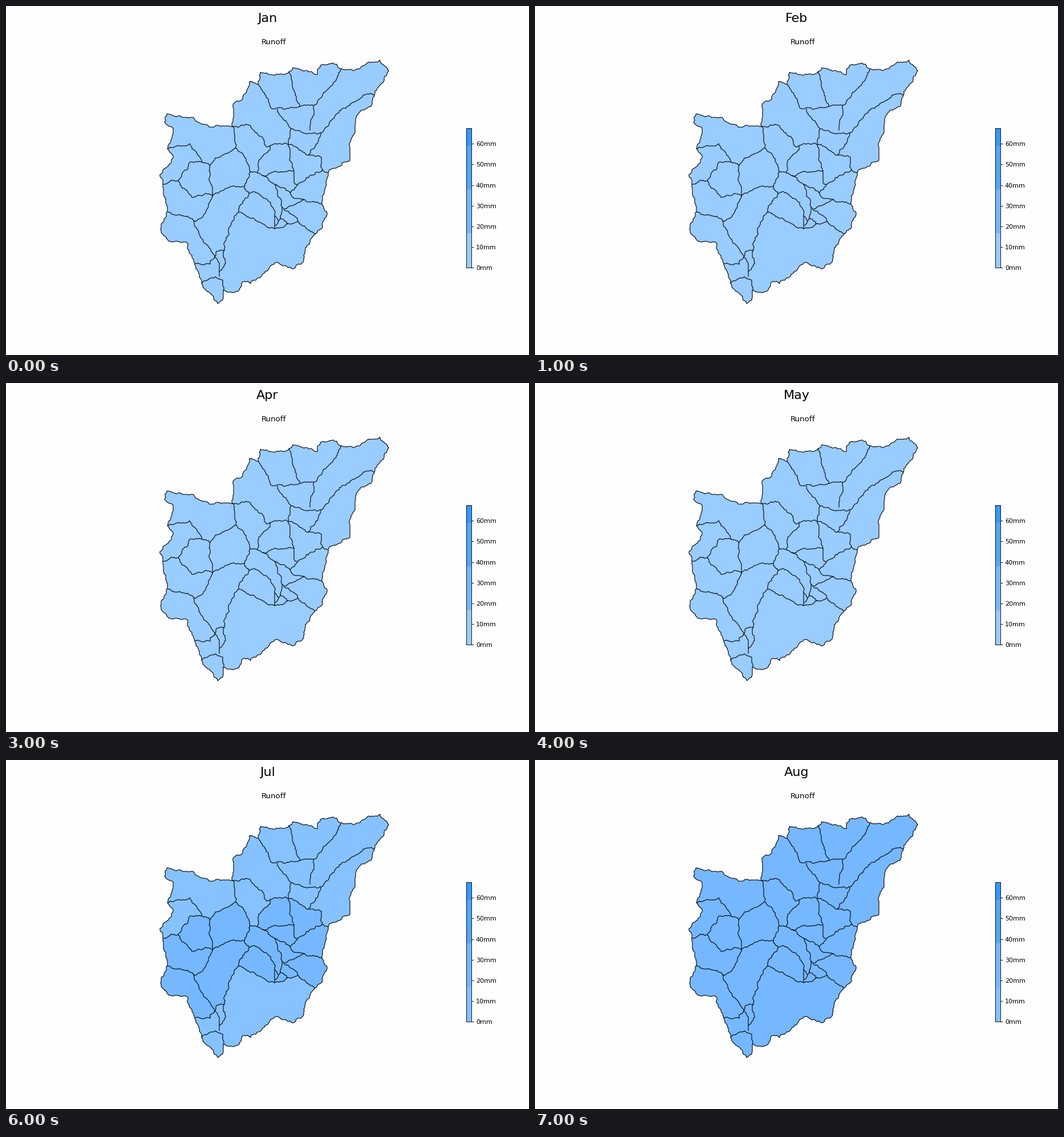
A matplotlib script for the animation above (8000 ms loop, 917 px wide and 611 px high).

```python
import numpy as np
import matplotlib.pyplot as plt
from matplotlib.animation import FuncAnimation
from matplotlib.collections import LineCollection
from matplotlib.patches import Polygon

W, H, DPI = 917, 611, 80
MONTHS = ["Jan", "Feb", "Mar", "Apr", "May", "Jun", "Jul", "Aug"]
PALE, SOFT, MILD = "#99ccff", "#94c8ff", "#85c2ff"
MID, DEEP, FULL = "#75b8ff", "#54a7ff", "#3399ff"

rng = np.random.default_rng(4)
borders = []


def roughen(a, b):
    """Split a-b by midpoint displacement; returns the points after a."""
    d = b - a
    length = np.hypot(*d)
    if length < 3.2 or d[0] == 0:  # upright borders stay straight
        return [b]
    side = np.array([-d[1], d[0]]) / length
    shift = rng.uniform(-1, 1) * min(0.19 * length, 2.2)
    m = np.round((a + b) / 2 + side * shift)
    if (m == a).all() or (m == b).all():
        return [b]
    return roughen(a, m) + roughen(m, b)


def line(*knots):
    """Store a ragged border through the key points."""
    pts = np.array(knots, float)
    out = [pts[0]]
    for a, b in zip(pts[:-1], pts[1:]):
        out += roughen(a, b)
    borders.append(np.array(out))
    return borders[-1]


# Outer edge, clockwise
northwest = line((275, 312), (270, 295), (293, 265), (283, 250), (293, 214),
                 (278, 203), (282, 189), (326, 195), (356, 212), (397, 211))
north = line((397, 211), (398, 172), (415, 163), (427, 132), (442, 137),
             (446, 116), (468, 121), (496, 115), (503, 108), (546, 120),
             (551, 104), (580, 102), (587, 110))
northeast = line((587, 110), (620, 110), (636, 98), (656, 95), (671, 113),
                 (646, 156), (640, 176), (617, 190), (605, 235), (603, 270),
                 (587, 280), (565, 292))
east = line((565, 292), (555, 332), (554, 347), (563, 365), (553, 390), (542, 399))
south = line((542, 399), (525, 427), (519, 450), (504, 460), (473, 449),
             (429, 486), (418, 482), (404, 500), (381, 498), (380, 515),
             (371, 521), (343, 486), (331, 451))
west = line((331, 451), (317, 414), (284, 410), (271, 390), (283, 360),
            (276, 330), (275, 312))

# Inner borders that rim the wetter basins
rim_west = line((275, 312), (302, 306), (323, 273), (344, 273), (358, 279),
                (372, 265), (403, 249), (416, 260), (428, 291), (441, 292))
rim_east = line((441, 292), (443, 270), (463, 252), (463, 244), (495, 242),
                (530, 261), (553, 265), (555, 287), (565, 292))
rim_south = line((542, 399), (512, 377), (471, 390), (455, 384), (408, 361),
                 (390, 393), (383, 427), (368, 432), (366, 440), (358, 452),
                 (331, 451))

# Western basins
line((283, 250), (322, 241), (344, 273))
line((302, 306), (326, 335), (362, 331))
line((358, 279), (357, 300), (362, 334), (346, 367), (329, 376))
line((397, 211), (401, 225), (403, 249))
line((428, 291), (418, 316), (386, 319), (362, 334))
line((283, 360), (314, 368), (329, 376), (340, 402), (366, 440), (374, 450),
     (374, 474))
line((383, 427), (382, 456), (374, 465))
line((343, 486), (367, 474), (380, 480), (381, 498))

# Northern basins
line((397, 211), (425, 208), (449, 229), (456, 246), (463, 245))
line((442, 137), (467, 180), (515, 176), (539, 174))
line((496, 115), (503, 145), (515, 176))
line((587, 110), (572, 139), (539, 174), (533, 218))
line((476, 180), (500, 215), (521, 222), (552, 222))
line((646, 156), (633, 154), (588, 181), (552, 222), (530, 261))
line((500, 215), (495, 242))

# Central basins
line((495, 242), (505, 289), (505, 309), (511, 313))
line((441, 292), (450, 297), (505, 289))
line((555, 287), (511, 313), (498, 327))
line((450, 297), (471, 312), (498, 327), (502, 334), (523, 339), (554, 347))
line((471, 312), (480, 336), (484, 352), (481, 371))
line((523, 339), (503, 349), (488, 355))
line((484, 352), (512, 377))
line((418, 316), (427, 328), (409, 350), (408, 361))
line((427, 328), (434, 325), (464, 344), (471, 367), (471, 390))
line((471, 367), (478, 376), (472, 385))
line((478, 376), (481, 371), (494, 382))

fig, ax = plt.subplots(figsize=(W / DPI, H / DPI), dpi=DPI, facecolor="#fefefe")
box = ax.get_position()
ax.set(xlim=(box.x0 * W, box.x1 * W), ylim=((1 - box.y0) * H, (1 - box.y1) * H))
ax.axis("off")
ax.set_title("Runoff")
month = fig.suptitle("", fontsize=20)

land = Polygon(np.vstack([northwest, north, northeast, east, south, west]), lw=0)
wet = Polygon(np.vstack([rim_west, rim_east, east, rim_south, west]), lw=0)
ax.add_patch(land)
ax.add_patch(wet)
ax.add_collection(LineCollection(borders, colors="black", linewidths=1,
                                 joinstyle="round", zorder=3), autolim=False)

# Colour bar
bar = fig.add_axes([0.88, 0.25, 0.01, 0.4])
steps = [0, 16.7, 38, 59, 67.6]
cells = [bar.axhspan(lo, hi, fc=color, lw=0) for lo, hi, color
         in zip(steps, steps[1:], [PALE, MID, DEEP, FULL])]
bar.set(xticks=[], xlim=(0, 1), ylim=(0, steps[-1]), yticks=range(0, 70, 10))
bar.yaxis.tick_right()
bar.yaxis.set_major_formatter("{x:.0f}mm")


def update(i):
    dry = [PALE, SOFT, MILD, MID][max(0, i - 4)]
    month.set_text(MONTHS[i])
    land.set_facecolor(dry)
    wet.set_facecolor(MID if i > 5 else dry)
    cells[0].set_facecolor(MILD if i > 5 else dry)
    return month, land, wet, cells[0]


anim = FuncAnimation(fig, update, frames=len(MONTHS), interval=1000,
                     repeat=True, repeat_delay=0, blit=False)
plt.show()
```
